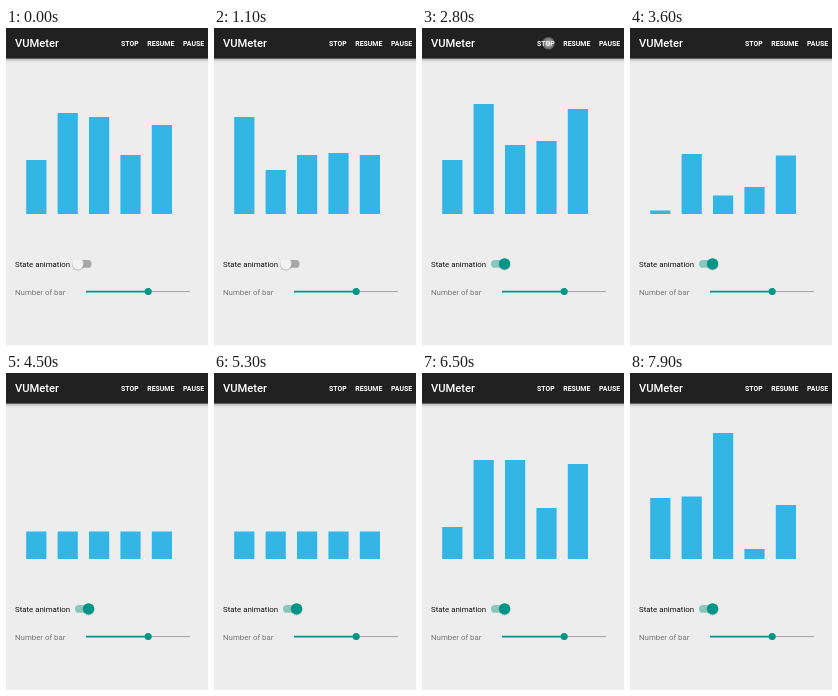
Animation of 202 by 317 pixels, one loop 8000 ms. Source, as an HTML page:

```html
<!DOCTYPE html>
<html lang="en">
<head>
<meta charset="utf-8">
<title>VUMeter</title>
<style>
  html, body { margin: 0; width: 100%; height: 100%; overflow: hidden; background: #ededed; }
  svg { display: block; width: 100vw; height: 100vh; font-family: Roboto, sans-serif; }
  .menu { font-size: 6.9px; font-weight: 700; fill: #fff; }
  .label { font-size: 7.85px; }
</style>
</head>
<body>
<svg viewBox="0 0 202 317">
  <defs>
    <linearGradient id="shade" x2="0" y2="1">
      <stop offset="0" stop-color="#000" stop-opacity=".38"/>
      <stop offset=".4" stop-color="#000" stop-opacity=".12"/>
      <stop offset="1" stop-color="#000" stop-opacity="0"/>
    </linearGradient>
    <radialGradient id="glow">
      <stop offset="0" stop-color="#fff" stop-opacity=".75"/>
      <stop offset=".6" stop-color="#ddd" stop-opacity=".55"/>
      <stop offset="1" stop-color="#999" stop-opacity=".45"/>
    </radialGradient>
  </defs>
  <rect width="202" height="317" fill="#ededed"/>
  <rect y="30" width="202" height="5" fill="url(#shade)"/>
  <rect width="202" height="30.5" fill="#212121"/>
  <text x="9" y="19" font-size="11.2" font-weight="500" fill="#fff">VUMeter</text>
  <g class="menu">
    <text x="115" y="17.6">STOP</text>
    <text x="141.3" y="17.6">RESUME</text>
    <text x="177" y="17.6">PAUSE</text>
  </g>
  <g id="bars" fill="#33b5e5"></g>

  <text class="label" x="9" y="238.6" fill="#111">State animation</text>
  <rect id="track" x="69" y="232" width="16.5" height="7.8" rx="3.9"/>
  <circle id="knobShade" cy="236.6" r="6" fill="#000" opacity=".2"/>
  <circle id="knob" cy="235.8" r="5.6"/>

  <text class="label" x="9" y="267" fill="#757575">Number of bar</text>
  <path d="M142 263.6H184" stroke="#a3a3a3"/>
  <path d="M80 263.6H142" stroke="#009688" stroke-width="1.7"/>
  <circle cx="142.2" cy="263.6" r="3.5" fill="#009688"/>
  <circle id="touch" cy="15.3" r="6.3" fill="url(#glow)"/>
</svg>
<script>
  const LOOP = 8000, STEP = 100, SPEED = 0.062, BASE = 186;
  const $ = id => document.getElementById(id);
  const set = (el, attrs) => Object.entries(attrs).forEach(([k, v]) => el.setAttribute(k, v));
  const clamp = x => Math.max(0, Math.min(1, x));

  // Heights at each stage; turn: 1 rises then falls, -1 falls then rises, 0 runs straight and stops.
  const stages = [
    { at: 0,    heights: [54, 101, 97, 59, 89],  turn: [-1, -1, -1, -1, -1] },
    { at: 1100, heights: [97, 44, 59, 61, 59],   turn: [1, 1, 1, 1, 1] },
    { at: 2800, heights: [54, 110, 69, 73, 105], turn: [0, 0, 0, 0, 0] },
    { at: 3600, heights: [3.5, 60, 18.5, 27, 58.5], turn: [0, 0, 0, 0, 0] },
    { at: 5300, heights: [27.5, 27.5, 27.5, 27.5, 27.5], turn: [1, 1, 1, 1, 1] },
    { at: 6500, heights: [32, 99, 99, 51, 95],   turn: [-1, 1, -1, 1, -1] },
    { at: 7900, heights: [61, 62.5, 126, 10, 54] }
  ];
  const taps = [{ from: 2800, to: 3000, x: 126.5 }, { from: 5000, to: 5200, x: 155 }];

  const bars = stages[0].heights.map((_, i) => {
    const bar = document.createElementNS('http://www.w3.org/2000/svg', 'rect');
    set(bar, { x: 20.2 + i * 31.4, width: 20.2 });
    return $('bars').appendChild(bar);
  });

  function barHeight(i, t) {
    const n = stages.findLastIndex(s => t >= s.at);
    const a = stages[n], b = stages[n + 1];
    const start = a.heights[i];
    if (!b) return start;
    const delta = b.heights[i] - start, dir = a.turn[i];
    const gone = SPEED * (t - a.at);
    if (!dir) return start + Math.sign(delta) * Math.min(gone, Math.abs(delta));
    const span = b.at - a.at;
    const travel = Math.max(SPEED * span, Math.abs(delta));
    const moved = travel * (t - a.at) / span;
    const peak = (travel + dir * delta) / 2;
    return start + dir * (peak - Math.abs(moved - peak));
  }

  function mix(from, to, p) {
    return `rgb(${from.map((c, i) => Math.round(c + (to[i] - c) * p))})`;
  }

  function draw(t) {
    bars.forEach((bar, i) => {
      const h = barHeight(i, t);
      set(bar, { y: BASE - h, height: h });
    });

    const p = clamp((t - 1900) / 300), on = p * p * (3 - 2 * p);
    const cx = 72 + 10.6 * on;
    set($('track'), { fill: mix([166, 166, 166], [137, 200, 193], on) });
    set($('knobShade'), { cx });
    set($('knob'), { cx, fill: mix([241, 241, 241], [0, 150, 136], on) });

    const tap = taps.find(k => t >= k.from && t < k.to);
    set($('touch'), { cx: tap ? tap.x : 0, opacity: tap ? 1 : 0 });
  }

  const begin = performance.now();
  function tick() {
    const t = (performance.now() - begin) % LOOP;
    draw(Math.floor(t / STEP) * STEP);
    requestAnimationFrame(tick);
  }
  tick();
</script>
</body>
</html>
```
